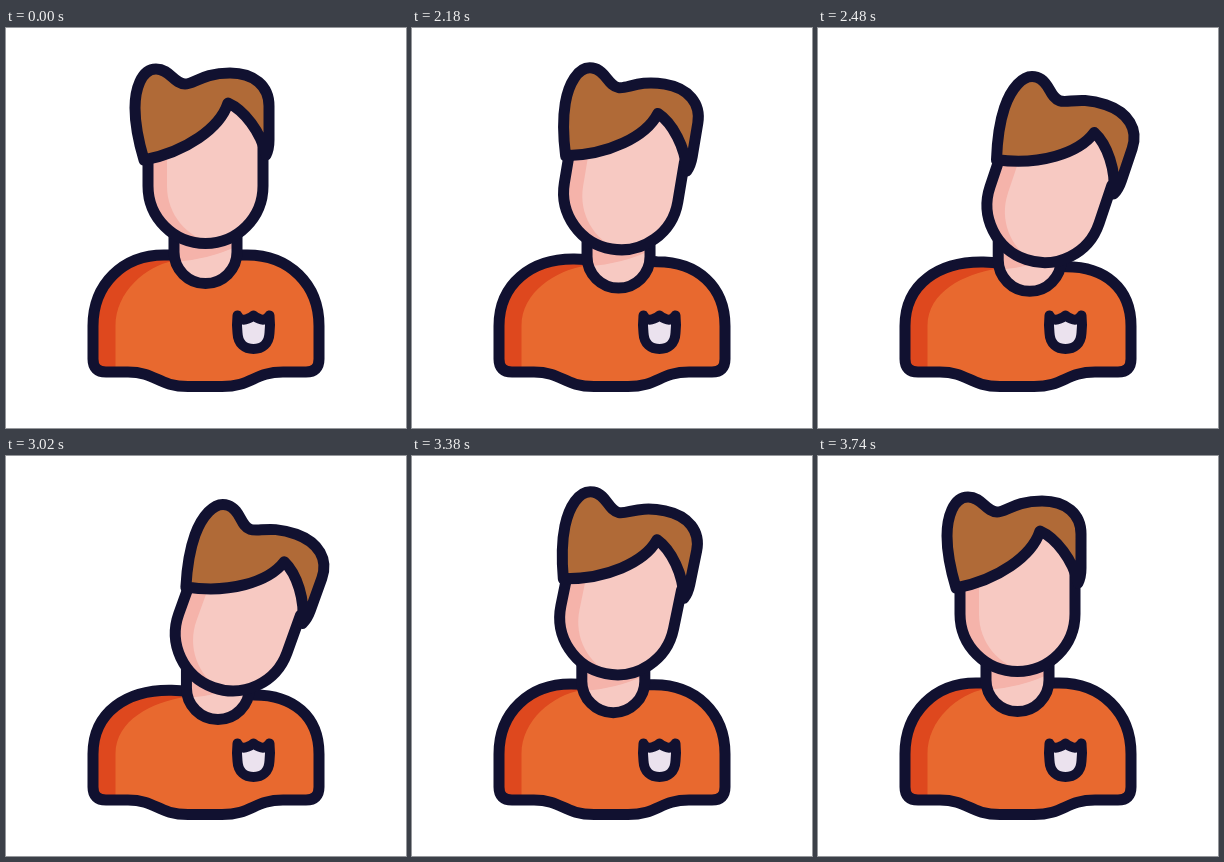
Write an HTML page that moves like this. It is 400 px wide and 400 px high and loops after 3770 ms.

```html
<!DOCTYPE html>
<html lang="en">
<head>
<meta charset="utf-8">
<title>Leaning person</title>
<style>
  html, body { margin: 0; width: 100%; height: 100%; overflow: hidden; background: #fff; }
  svg { display: block; width: 100%; height: 100%; }
  .line { stroke: #111130; stroke-width: 11; stroke-linejoin: round; stroke-linecap: round; }
  .open { fill: none; }
  .skin { fill: #f7c9c2; }
  .blush { fill: #f5b3aa; }
  .hair { fill: #b06a37; }
  .shirt { fill: #e8692f; }
  .fold { fill: #de481e; }
  .badge { fill: #ebe2ee; stroke-width: 10; }
</style>
</head>
<body>
<svg viewBox="0 0 400 400">
  <path id="shirt" class="shirt"/>
  <path id="fold" class="fold"/>
  <path id="seam" class="line open"/>
  <path class="line badge" d="M231.500 287.500C234 293 240 293 247.500 287.500C255 293 260 293 263.500 287.500Q264.500 297 263.500 305C263 316 256 321 247.500 321C239 321 232 316 231.500 305Q230.500 297 231.500 287.500Z"/>
  <g id="neck">
    <path class="skin" d="M168 200V224A31.500 31.500 0 0 0 231 224V200Z"/>
    <path class="blush" d="M168 200V234Q205 231 231 218V200Z"/>
    <path class="line open" d="M168 205V224A31.500 31.500 0 0 0 231 224V205"/>
  </g>
  <g id="head">
    <g id="face">
      <path class="blush" d="M142 110V158A57.500 57.500 0 0 0 257 158V100L222 70Z"/>
      <path class="skin" d="M161 110V158C161 187 181 209 206 215C238 211 257 188 257 158V100L222 70Z"/>
      <path class="line open" d="M142 128V158A57.500 57.500 0 0 0 257 158V118"/>
    </g>
    <path class="line hair" d="M138 132C132 112 129 96 129 80C129 62 135 41 150 41C164 41 168 56 179 56C188 56 197 45 224 45C248 45 263 58 263 78V112C263 119 262 123 260 127C255 104 238 82 222 75C214 100 180 124 138 132Z"/>
  </g>
</svg>
<script>
const LOOP = 3770, STEP = 30, FIRST = 2030;
const LEAN = 2000, BACK = 3000;
const ANGLE = 19.8;
const $ = id => document.getElementById(id);

function bezier(x1, x2) {
  // y control points are 0 and 1: flat at both ends
  return x => {
    let lo = 0, hi = 1;
    for (let i = 0; i < 24; i++) {
      const u = (lo + hi) / 2, v = 1 - u;
      if (3 * u * v * v * x1 + 3 * u * u * v * x2 + u * u * u < x) lo = u; else hi = u;
    }
    return lo * lo * (3 - 2 * lo);
  };
}

const smooth = x => x * x * (3 - 2 * x);
const tiltOut = bezier(.2, .18);
const tiltBack = bezier(.78, .3);

function part(t, start, length, ease) {
  return ease(Math.min(1, Math.max(0, (t - start) / length)));
}

function move(id, x, y, turn = '') {
  $(id).setAttribute('transform', `translate(${x} ${y}) ${turn}`);
}

function drawShirt(x, y) {
  const left = `${167 + x} ${227 + y}`, right = `${233 + x} ${227 + y * 1.45}`;
  const shoulderL = `C87 256 ${117 + x * .3} ${227 + y * .8} ${158 + x * .6} ${227 + y * .9}L${left}`;
  const shoulderR = `${right}L${241 + x * .6} ${227 + y * 1.5}C${283 + x * .3} ${227 + y * 1.5} 313 ${256 + y * .5} 313 298`;
  const hem = 'V331Q313 344 300 344H277C248 344 246 358.500 216 358.500H182C152 358.500 150 344 122 344H100Q87 344 87 331V298';
  $('shirt').setAttribute('d', `M${shoulderR}${hem}${shoulderL}Z`);
  $('seam').setAttribute('d', `M${shoulderR}${hem}${shoulderL}`);
  $('fold').setAttribute('d', `M87 298${shoulderL}V${233 + y}C${140 + x * .5} ${238 + y} 109.500 264 109.500 298V344H100Q87 344 87 331Z`);
}

function draw(t) {
  if (t >= FIRST) t = FIRST + Math.floor((t - FIRST) / STEP) * STEP;
  else t = 0;
  const body = part(t, LEAN, 600, tiltOut) - part(t, BACK, 500, smooth);
  const shift = part(t, LEAN, 500, smooth) - part(t, BACK, 455, smooth);
  const tilt = part(t, LEAN, 700, tiltOut) - part(t, BACK, 750, tiltBack);
  const x = 12.5 * body, y = 8 * body;
  drawShirt(x, y);
  move('neck', x, y);
  move('head', 20.7 * shift, 15.2 * shift, `rotate(${ANGLE * tilt} 195 185)`);
  // the face sags a little as the head tips over
  move('face', -1.6 * tilt, 1.8 * tilt);
}

const origin = performance.now();
function tick() {
  draw((performance.now() - origin) % LOOP);
  requestAnimationFrame(tick);
}
tick();
</script>
</body>
</html>
```
